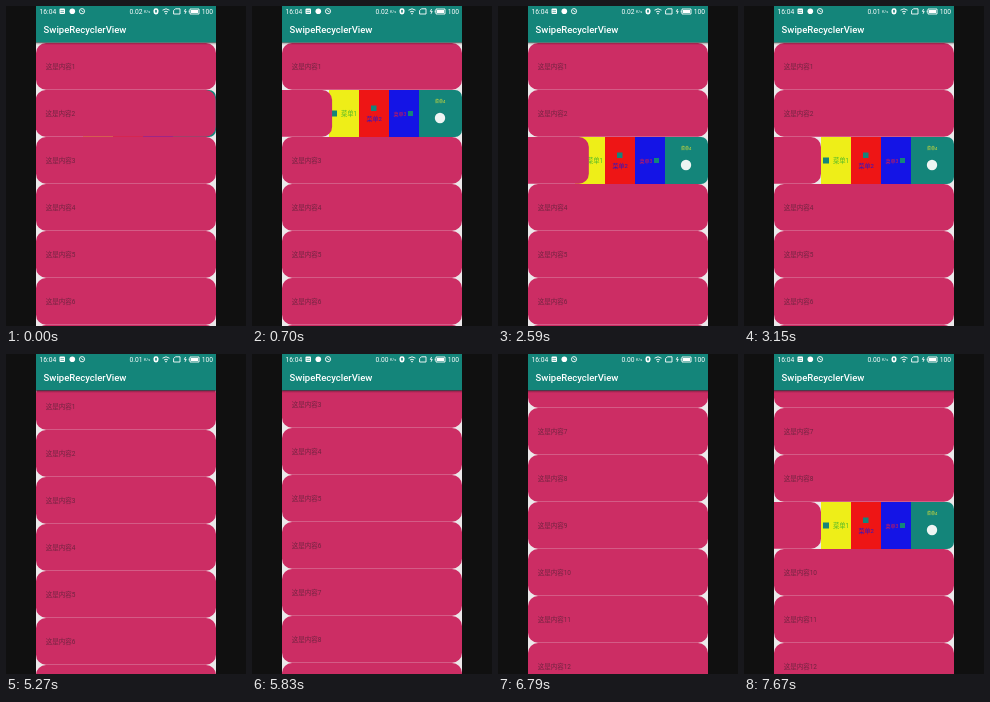
Recreate the animation shown at these times as an HTML page with a canvas. Size 240 by 320 pixels, loop 8000 ms.

```html
<!DOCTYPE html>
<html lang="zh-CN">
<head>
<meta charset="utf-8">
<style>
  html, body { margin: 0; height: 100%; overflow: hidden; background: #101010; }
  canvas { display: block; }
</style>
</head>
<body>
<canvas width="240" height="320"></canvas>
<script>
const ctx = document.querySelector('canvas').getContext('2d');
const LOOP = 8000, STEP = 70;
const LEFT = 30, RIGHT = 210, WIDTH = RIGHT - LEFT;
const LIST_TOP = 37, PITCH = 47, MENU_WIDTH = 133;
const TEAL = '#14857a', PINK = '#cc2d64', PAPER = '#ece8ea';
const FONT = 'Roboto, "Noto Sans CJK SC", "Noto Sans CJK", sans-serif';

// Progress from start to end, advancing in 70 ms steps
function progress(t, start, end) {
  const stepped = Math.floor((t - start) / STEP) * STEP;
  return Math.max(0, Math.min(1, stepped / (end - start)));
}
const easeOut = p => 1 - (1 - p) ** 2;
const easeInOut = p => p * p * (3 - 2 * p);

function scrollAt(t) {
  if (t < 5270) return 0;
  if (t < 6160) return 8 + 96 * easeOut(progress(t, 5270, 5830));
  return 112 + 153 * easeOut(progress(t, 6160, 6790));
}

// The open row and how far its card has moved
function swipeAt(t) {
  const slide = (row, start, end) =>
    ({ row, shift: Math.max(0.3, MENU_WIDTH * easeInOut(progress(t, start, end))) });
  if (t < 1970) return slide(2, 0, 770);
  if (t >= 2100 && t < 5270) return slide(3, 2030, 2730);
  if (t >= 7250) return slide(9, 7180, 7670);
  return { row: 0, shift: 0 };
}

function rect(x, y, w, h, color) {
  ctx.fillStyle = color;
  ctx.fillRect(x, y, w, h);
}
function rounded(x, y, w, h, radius, color) {
  ctx.fillStyle = color;
  ctx.beginPath();
  ctx.roundRect(x, y, w, h, radius);
  ctx.fill();
}
function disc(x, y, r, color) {
  ctx.fillStyle = color;
  ctx.beginPath();
  ctx.arc(x, y, r, 0, 7);
  ctx.fill();
}
function label(text, x, y, size, color, weight = 400) {
  ctx.font = `${weight} ${size}px ${FONT}`;
  ctx.fillStyle = color;
  ctx.fillText(text, x, y);
}
function strokePath(d) {
  ctx.strokeStyle = '#fff';
  ctx.lineWidth = 0.9;
  ctx.stroke(new Path2D(d));
}

function drawMenu(y) {
  ctx.save();
  ctx.beginPath();
  ctx.roundRect(RIGHT - MENU_WIDTH, y, MENU_WIDTH, PITCH, [0, 7, 7, 0]);
  ctx.clip();
  rect(77, y, 30, PITCH, '#eeee18');
  rect(107, y, 30, PITCH, '#ee1515');
  rect(137, y, 30, PITCH, '#1414e6');
  rect(167, y, 43, PITCH, TEAL);
  rect(79, y + 20.5, 6, 6, TEAL);
  label('菜单1', 89, y + 26, 6.3, '#4fb82a');
  rect(119, y + 15.5, 5.5, 5.5, TEAL);
  label('菜单2', 114.5, y + 31, 6, '#2a18c8');
  label('菜单3', 141.5, y + 25.5, 5, '#d81c48');
  rect(156, y + 21, 5, 5, TEAL);
  label('菜单4', 183, y + 13, 4, '#e2e234');
  disc(188, y + 28, 5.2, '#eef5f3');
  ctx.restore();
}

function drawList(t) {
  const scroll = scrollAt(t), swipe = swipeAt(t);
  const first = Math.floor(scroll / PITCH) + 1;
  rect(LEFT, 36, WIDTH, 284, PAPER);
  for (let row = first; row < first + 8; row++) {
    const y = LIST_TOP + (row - 1) * PITCH - scroll;
    const open = row === swipe.row;
    const x = LEFT - (open ? swipe.shift : 0);
    if (open) drawMenu(y);
    rounded(x, y, WIDTH, PITCH - 0.3, 10, PINK);
    label('这是内容' + row, x + 9.7, y + 25.7, 6.5, '#702440');
  }
}

function drawStatusBar(t) {
  const speed = t < 2800 ? '0.02' : t < 5550 ? '0.01' : '0.00';
  label('16:04', 33.5, 7.8, 6.7, '#fff');
  rounded(53.5, 2.5, 5.5, 5.5, 1, '#fff');
  rect(54.5, 4.5, 3.5, 0.6, TEAL);
  rect(54.5, 6, 3.5, 0.6, TEAL);
  disc(66.3, 5.2, 2.8, '#fff');
  strokePath('M78.6 5.2a2.6 2.6 0 1 1-5.2 0a2.6 2.6 0 1 1 5.2 0M75 4.2l1.2 1.2h1.2');
  label(speed, 123.5, 7.8, 6.7, '#fff');
  label('K/s', 138, 6.8, 4, '#fff');
  rounded(147.5, 2.2, 5, 6.2, 2.4, '#fff');
  rounded(149.2, 3.8, 1.6, 3, 0.7, TEAL);
  strokePath('M156.5 4.2Q160 1.4 163.5 4.2M158 6Q160 4.4 162 6');
  disc(160, 7.6, 0.8, '#fff');
  strokePath('M167.6 8V4.6L169.4 2.8H174V8Z');
  strokePath('M179.6 3l-1.2 2.4h1.8L179 7.8');
  strokePath('M184 3h9v5h-9ZM183.2 4.5v2');
  rect(185, 4, 7, 3, '#fff');
  label('100', 195.7, 7.8, 6.7, '#fff');
}

function drawHeader(t) {
  rect(LEFT, 0, WIDTH, 36.5, TEAL);
  const shadow = ctx.createLinearGradient(0, 36, 0, 39);
  shadow.addColorStop(0, 'rgba(0,0,0,.4)');
  shadow.addColorStop(1, 'rgba(0,0,0,0)');
  rect(LEFT, 36, WIDTH, 3, shadow);
  drawStatusBar(t);
  label('SwipeRecyclerView', 37.6, 27, 9.5, '#fff', 500);
}

function frame() {
  const t = performance.now() % LOOP;
  rect(0, 0, 240, 320, '#101010');
  ctx.save();
  ctx.beginPath();
  ctx.rect(LEFT, 0, WIDTH, 320);
  ctx.clip();
  drawList(t);
  drawHeader(t);
  ctx.restore();
  requestAnimationFrame(frame);
}
frame();
</script>
</body>
</html>
```
